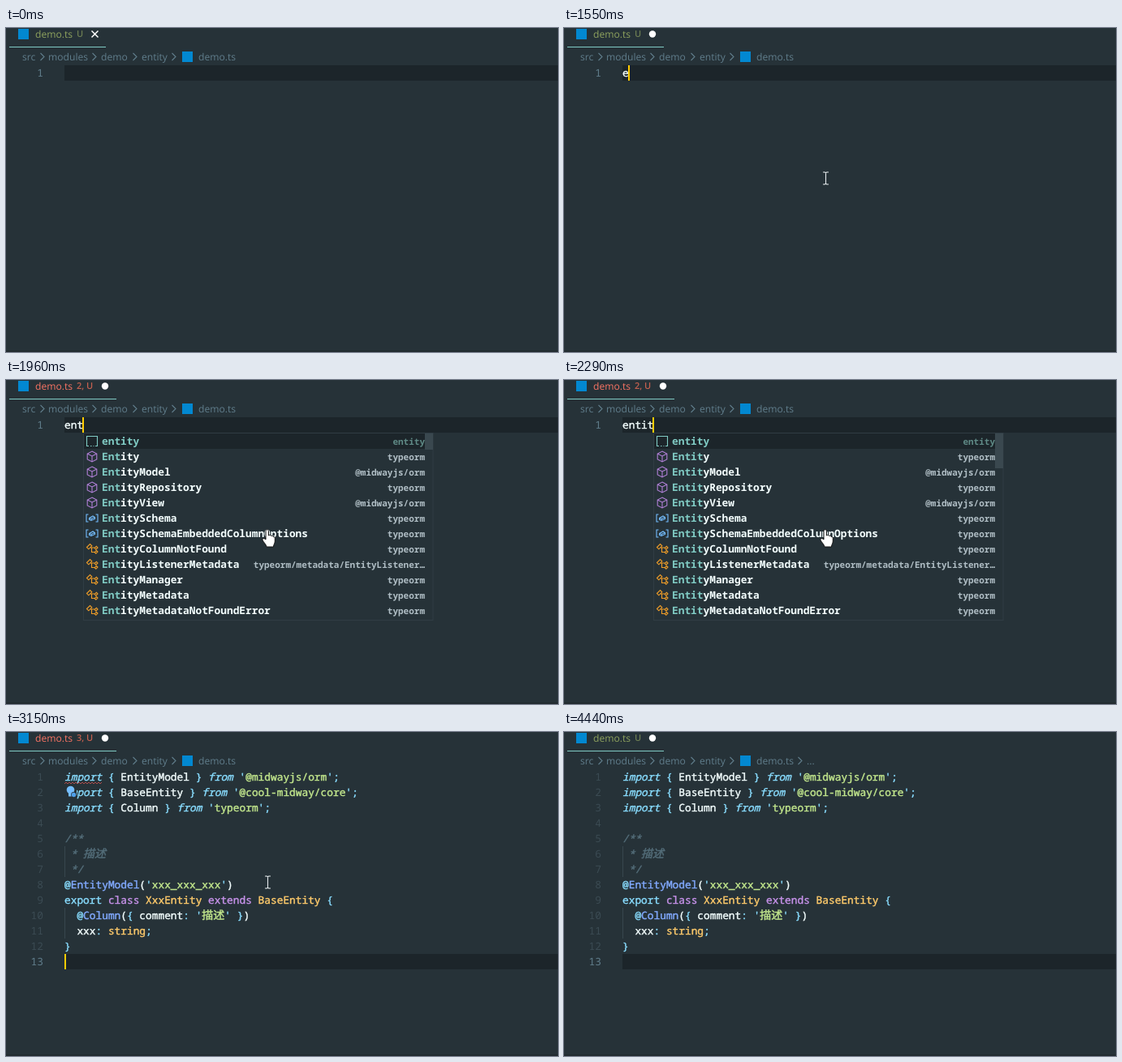
Recreate the animation shown at these times as an HTML page with a canvas. Size 680x400 px, loop 4520 ms.

```html
<!DOCTYPE html>
<html lang="en">
<head>
<meta charset="utf-8">
<style>
  html, body { margin: 0; height: 100%; overflow: hidden; background: #263238; }
  canvas { display: block; }
</style>
</head>
<body>
<canvas id="stage" width="680" height="400"></canvas>
<script>
const ctx = document.getElementById('stage').getContext('2d');
ctx.textRendering = 'geometricPrecision';

const LOOP = 4520, ROW = 19, TOP = 46, LEFT = 72, CHAR = 7.7;
const MONO = '"Noto Sans Mono", "Noto Sans CJK SC", "Noto Sans CJK", monospace';
const UI = '"Open Sans", "Noto Sans", sans-serif';
const CODE = '12.83px ' + MONO;
const CYAN = '#89ddff', WHITE = '#f4ffff', TEAL = '#80cbc4', DARK = '#1c252a';

const typing = [[1550, 'e'], [1680, 'en'], [1960, 'ent'], [2090, 'enti'], [2290, 'entit'], [2430, 'entity']];
const POPUP = 1750, ERROR_3 = 2860, SNIPPET = 3150, OUTLINE = 3430, CLEAN = 3560;
const caretOn = [[550, 1070], [1550, 2950], [3150, 3440], [3940, 4440]];

// First letter of each token selects its style.
const styles = {
  i: [CYAN, 'italic ' + CODE], p: [CYAN, CODE], w: [WHITE, CODE], s: ['#c3e88d', CODE],
  c: ['#546e7a', 'italic ' + CODE], b: ['#82aaff', CODE], k: ['#c792ea', CODE], y: ['#ffcb6b', CODE],
  z: ['#c3e88d', '14px ' + MONO], Z: ['#546e7a', 'italic 14px ' + MONO]
};
const code = [
  "iimport|p { |wEntityModel|p } |ifrom|p '|s@midwayjs/orm|p';",
  "iimport|p { |wBaseEntity|p } |ifrom|p '|s@cool-midway/core|p';",
  "iimport|p { |wColumn|p } |ifrom|p '|stypeorm|p';",
  "",
  "c/**",
  "c * |Z描述",
  "c */",
  "p@|bEntityModel|w(|p'|sxxx_xxx_xxx|p'|w)",
  "pexport |kclass |yXxxEntity |kextends |yBaseEntity|p {",
  "p  @|bColumn|w(|p{ |wcomment|p: '|z描述|p' }|w)",
  "p  |wxxx|p: |ystring|p;",
  "p}",
  ""
];

const suggestions = [
  ['snippet', 'entity', 'entity'],
  ['cube', 'Entity', 'typeorm'],
  ['cube', 'EntityModel', '@midwayjs/orm'],
  ['cube', 'EntityRepository', 'typeorm'],
  ['cube', 'EntityView', '@midwayjs/orm'],
  ['variable', 'EntitySchema', 'typeorm'],
  ['variable', 'EntitySchemaEmbeddedColumnOptions', 'typeorm'],
  ['klass', 'EntityColumnNotFound', 'typeorm'],
  ['klass', 'EntityListenerMetadata', 'typeorm/metadata/EntityListener…'],
  ['klass', 'EntityManager', 'typeorm'],
  ['klass', 'EntityMetadata', 'typeorm'],
  ['klass', 'EntityMetadataNotFoundError', 'typeorm']
];

// Icon outlines around their centre.
const icons = {
  snippet: [TEAL, 'M-4 6H-6.5V-6H6.5V6H4M-2 6H-.5M1.5 6H2.5'],
  cube: ['#b180d7', 'M0 -6.5L5.8 -3.5V3.5L0 6.5L-5.8 3.5V-3.5ZM-5.8 -3.5L0 -.5L5.8 -3.5M0 -.5V6.5'],
  variable: ['#75beff', 'M-4.5 -4.5H-7V4.5H-4.5M4.5 -4.5H7V4.5H4.5M-3.5 0L1 -2.5L3.5 -1V1L-1 3L-3.5 2ZM-3.5 0L-1 1L3.5 -1M-1 1V3'],
  klass: ['#ee9d28', 'M-6.5 -2L-2.5 -6L-.2 -3.7L-4.2 .3ZM-2.5 -1.5H3.5M-.5 -1.5V4H3.5M3.2 -1L5.4 -3.2L7 -1.6L4.8 .6ZM3.2 4.2L5.4 2L7 3.6L4.8 5.8Z']
};

function rect(x, y, w, h, color) {
  ctx.fillStyle = color;
  ctx.fillRect(x, y, w, h);
}
function text(str, x, y, color, font, align = 'left') {
  ctx.fillStyle = color;
  ctx.font = font;
  ctx.textAlign = align;
  ctx.fillText(str, x, y);
  return ctx.measureText(str).width;
}
// Editor text is a little heavier than the regular weight.
function codeText(str, x, y, color, font) {
  const width = text(str, x, y, color, font);
  ctx.strokeStyle = color;
  ctx.lineWidth = .4;
  ctx.strokeText(str, x, y);
  return width;
}
function shape(path, x, y, stroke, fill, width = 1.1) {
  const p = new Path2D(path);
  ctx.save();
  ctx.translate(x, y);
  if (fill) { ctx.fillStyle = fill; ctx.fill(p); }
  ctx.strokeStyle = stroke;
  ctx.lineWidth = width;
  ctx.stroke(p);
  ctx.restore();
}
function disc(x, y, r, color) {
  ctx.fillStyle = color;
  ctx.beginPath();
  ctx.arc(x, y, r, 0, 7);
  ctx.fill();
}

function drawHeader(t) {
  const errors = t < POPUP || t >= CLEAN ? 0 : t < ERROR_3 ? 2 : 3;
  const end = errors ? 136 : 123;
  rect(15, 1, 13, 13, '#0288d1');
  text('demo.ts', 36, 12, errors ? '#fa7464' : '#8fa35e', '12.1px ' + UI);
  text(errors ? errors + ', U' : 'U', 87, 11, errors ? '#c4604f' : '#6c7d52', '600 11px ' + UI);
  if (t < 1550) shape('M-4 -4L4 4M4 -4L-4 4', 109.5, 7.5, '#fff', null, 1.5);
  else disc(end - 14, 7.5, 4.2, '#fff');
  rect(4, 23, end - 4, 1, TEAL);

  const crumbs = [['src', 20, 45], ['modules', 52, 109], ['demo', 117, 159], ['entity', 167, 207], ['demo.ts', 237, 291]];
  const more = t >= OUTLINE;
  for (const [name, x, arrow] of crumbs) {
    text(name, x, 40, '#607d8b', '12.1px ' + UI);
    if (arrow < 291 || more) shape('M-2.5 -4.5L2 0L-2.5 4.5', arrow, 35.5, '#607d8b');
  }
  if (more) text('...', 299, 40, '#607d8b', '12.1px ' + UI);
  rect(217, 29, 13, 13, '#0288d1');
}

function lineNumber(row, active) {
  text(row + 1, 46, TOP + row * ROW + 14, active ? '#607d8b' : '#3b4b53', CODE, 'right');
}
function squiggle() {
  let path = 'M0 2';
  for (let x = 2; x <= 46; x += 2) path += `L${x} ${x % 4 ? 0 : 2}`;
  shape(path, LEFT, 62, '#c0504e', null, .9);
}
function bulb(x, y) {
  disc(x, y - 2, 4.8, '#75beff');
  rect(x - 2.5, y + 1, 5, 5, '#75beff');
  disc(x + 4, y + 4, 3.4, '#263238');
  disc(x + 4, y + 4, 2.7, '#4f9fe8');
}

function drawSnippet(t) {
  for (const row of [5, 6, 9, 10]) rect(LEFT, TOP + row * ROW, 1, ROW, '#37464e');
  code.forEach((line, row) => {
    lineNumber(row, row === 12);
    let x = LEFT;
    for (const token of line ? line.split('|') : []) {
      x += codeText(token.slice(1), x, TOP + row * ROW + 14, ...styles[token[0]]);
    }
  });
  if (t < CLEAN) {
    squiggle();
    rect(LEFT, 66, 15, 17, '#263238');
    bulb(79.5, 73.5);
  }
}

function drawPopup(x, count) {
  rect(x, 65, 431.5, 232, '#303d44');
  rect(x + 1, 66, 429.5, 230, '#263238');
  rect(x + 1, 66, 429.5, ROW, DARK);
  rect(x + 421, 66, 10, [20, 20, 20, 32, 43, 55][count - 1], '#3a484f');
  suggestions.forEach(([icon, label, detail], row) => {
    const y = 80 + row * ROW, bold = '600 12.83px ' + MONO;
    const [color, path] = icons[icon];
    shape(path, x + 11, y - 4.5, color);
    const split = row ? count : label.length;
    const width = text(label.slice(0, split), x + 23, y, TEAL, bold);
    text(label.slice(split), x + 23 + width, y, WHITE, bold);
    text(detail, x + 421, y, row ? '#b0bec5' : '#5f8a86', '600 11px ' + MONO, 'right');
  });
}

function drawMouse(t) {
  const step = (start, n) => Math.floor((t - start) / 69) / n;
  let x = 322, y = 185;
  if (t < 70 || t >= 4170) return;
  if (t < 620) {
    const left = (1 - Math.min(1, step(70, 7))) ** 2;
    x = 325 + 236 * left;
    y = 187 + 167 * left;
  } else if (t >= 3820) {
    const p = (step(3820, 5) + .2) ** 1.5;
    x += 349 * Math.min(1, p);
    y += 195 * Math.min(1, p);
  }
  if (t >= POPUP && t < SNIPPET) {
    shape('M-2 1.5C-2 -.8 1.5 -.8 1.5 1.5V7C2.5 6 4.3 6.3 4.5 7.5C6 6.8 7 7.5 7.2 8.6C8.8 8.3 9.3 9.2 9.3 10.5V14C9.3 17 7.5 18 7.5 21H-1C-1.5 18 -5 15 -6 12.5C-6.5 10.5 -4 9.8 -2 12Z',
      x, y, '#111', '#fff', 1);
  } else {
    shape('M-3.5 -7.5H-1L0 -6.5L1 -7.5H3.5M0 -6.5V6.5M-3.5 7.5H-1L0 6.5L1 7.5H3.5', x + .5, y + .5, '#e4eaec');
  }
}

function draw(t) {
  rect(0, 0, 680, 400, '#263238');
  rect(0, 398, 680, 2, '#212b30');
  drawHeader(t);

  const done = t >= SNIPPET;
  const typed = done ? '' : typing.reduce((word, [at, next]) => t >= at ? next : word, '');
  const caretX = LEFT + typed.length * CHAR, caretY = TOP + (done ? 12 : 0) * ROW;
  rect(LEFT, caretY, 680 - LEFT, ROW, DARK);

  if (done) drawSnippet(t);
  else {
    lineNumber(0, true);
    codeText(typed, LEFT, 60, WHITE, CODE);
    if (t >= 2760) squiggle();
    if (t >= ERROR_3) bulb(126, 54);
  }
  if (caretOn.some(([on, off]) => t >= on && t < off)) {
    rect(Math.max(LEFT, Math.round(caretX - 1.1)), caretY, 2, ROW, '#ffcc00');
  }
  if (t >= POPUP && !done) drawPopup(Math.floor(caretX), typed.length);
  drawMouse(t);
}

function tick() {
  draw(performance.now() % LOOP);
  requestAnimationFrame(tick);
}
tick();
</script>
</body>
</html>
```
